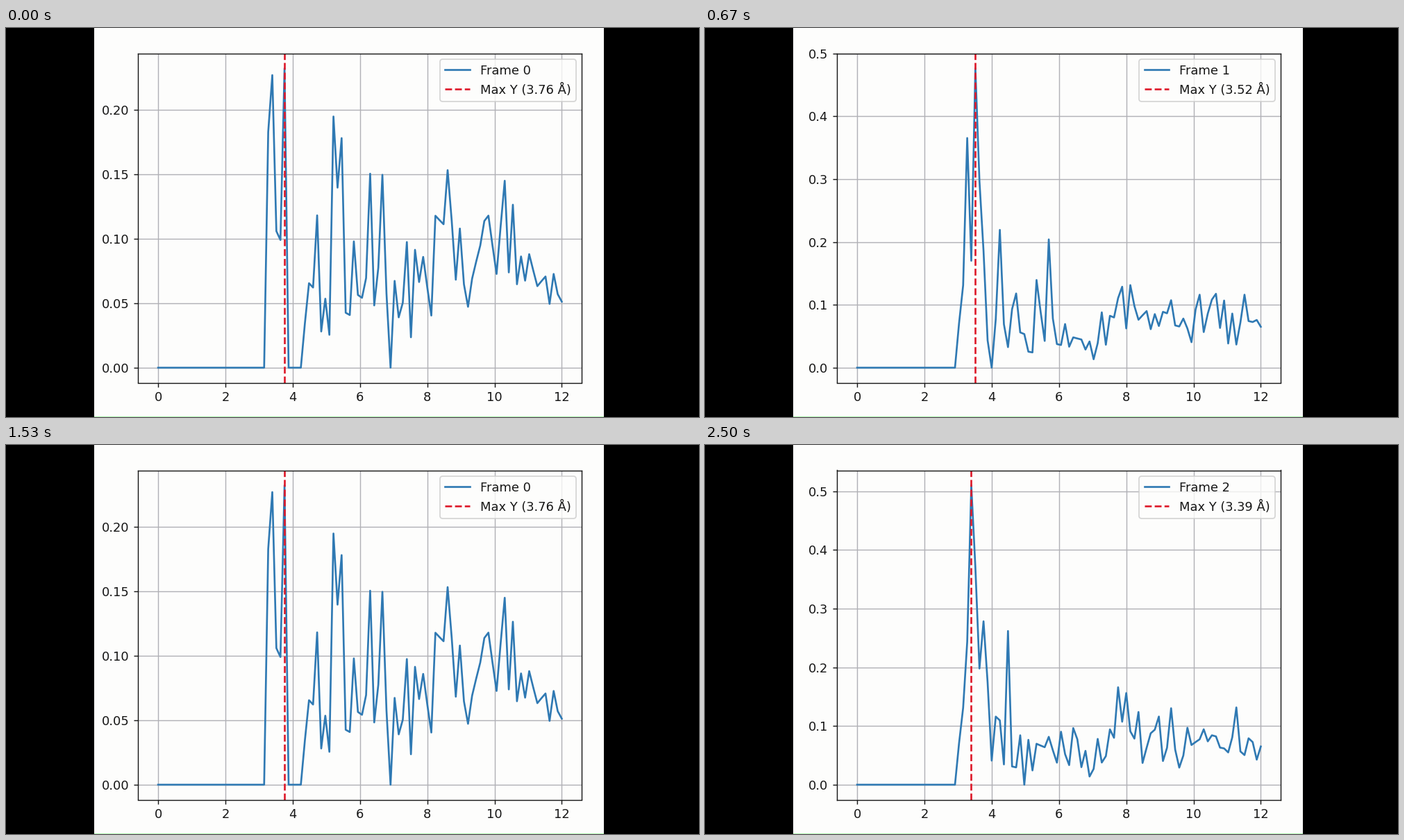
Animation of 998x561 px, one loop 2530 ms. Source, as a matplotlib script:

```python
import matplotlib.pyplot as plt
import numpy as np
from matplotlib.animation import FuncAnimation
from matplotlib.patches import Rectangle

W, H, DPI = 998, 561, 128
FRAMES, LOOP_MS = 76, 2530
HOLD, OFFSET = 15, 4          # frames per plot, frames already elapsed at start
PAPER, INK = "#fdfdfc", "#161616"
BLUE, RED, GRID = "#2f79b3", "#de1a2b", "#b1b1b6"

plt.rcParams.update({
    "font.family": "DejaVu Sans", "font.size": 10.06,
    "text.color": INK, "axes.edgecolor": INK, "axes.facecolor": PAPER,
    "xtick.color": INK, "ytick.color": INK, "grid.color": GRID,
    "lines.linewidth": 1.5,
})

# Pair counts per distance bin; every bin before the first listed one is empty.
BINS, R_MAX, NORM = 100, 12, 0.6766
counts_a = [
    3, 4, 2, 2, 5, 0, 0, 0, 0, 1, 2, 2, 4, 1, 2, 1, 8, 6, 8, 2, 2, 5, 3, 3, 4,
    9, 3, 5, 10, 4, 0, 5, 3, 4, 8, 2, 8, 6, 8, 6, 4, 12, 12, 12, 17, 13, 8, 13,
    8, 6, 9, 11, 13, 16, 17, 14, 11, 17, 23, 12, 21, 11, 15, 12, 16, 14, 12,
    13, 14, 10, 15, 12, 11]
counts_b = [
    1, 2, 6, 3, 9, 6, 4, 1, 0, 2, 6, 2, 1, 3, 4, 2, 2, 1, 1, 6, 4, 2, 10, 4, 2,
    2, 4, 2, 3, 3, 3, 2, 3, 1, 3, 7, 3, 7, 7, 10, 12, 6, 13, 10, 8, 9, 10, 7,
    10, 8, 11, 11, 14, 9, 9, 11, 9, 6, 14, 18, 9, 14, 18, 20, 11, 19, 7, 16, 7,
    14, 23, 15, 15, 16, 14]
counts_c = [
    1, 2, 4, 9, 7, 4, 6, 4, 1, 3, 3, 1, 8, 1, 1, 3, 0, 3, 1, 3, 3, 3, 4, 3, 2,
    5, 3, 2, 6, 5, 2, 4, 1, 2, 6, 3, 4, 8, 7, 15, 10, 15, 9, 8, 13, 4, 7, 10,
    11, 14, 5, 8, 17, 8, 4, 7, 14, 10, 11, 12, 15, 12, 14, 14, 11, 11, 10, 15,
    25, 11, 10, 16, 15, 9, 14]

r = np.linspace(0, R_MAX, BINS)
shell = (r + r[1] / 2) ** 2


def density(counts):
    """Divide the counts by the size of their spherical shells."""
    full = np.zeros(BINS)
    full[-len(counts):] = counts
    return NORM * full / shell


def make_plot(fig, number, counts, step):
    left, right, bottom, top = 190, 829.5, 49.5, 524.5
    ax = fig.add_axes([left / W, bottom / H, (right - left) / W, (top - bottom) / H])
    y = density(counts)
    peak = r[y.argmax()]
    ax.plot(r, y, color=BLUE, label=f"Frame {number}")
    ax.axvline(peak, color=RED, ls="--", label=f"Max Y ({peak:.2f} Å)")
    ax.set_xlim(-0.05 * R_MAX, 1.05 * R_MAX)
    ax.set_ylim(-0.05 * y.max(), 1.05 * y.max())
    ax.set_xticks(range(0, R_MAX + 1, 2))
    ax.set_yticks(np.arange(0, 1.05 * y.max(), step))
    ax.yaxis.set_major_formatter("{x:.2f}" if step < 0.1 else "{x:.1f}")
    ax.grid(True)
    ax.legend(loc="upper right")
    return ax


fig = plt.figure(figsize=(W / DPI, H / DPI), dpi=DPI, facecolor="black")
for y0, height, color in ((0, H, PAPER), (0, 1.4, "#b4f7b4")):
    fig.add_artist(Rectangle((127, y0), 734, height, color=color, lw=0,
                             transform=None, zorder=-1))

plots = [make_plot(fig, 0, counts_a, 0.05),
         make_plot(fig, 1, counts_b, 0.1),
         make_plot(fig, 2, counts_c, 0.1)]


def update(k):
    shown = (k + OFFSET) // HOLD % len(plots)
    for i, ax in enumerate(plots):
        ax.set_visible(i == shown)
    return plots


update(0)
anim = FuncAnimation(fig, update, frames=FRAMES, interval=LOOP_MS / FRAMES,
                     repeat=True, repeat_delay=0, blit=False)
plt.show()
```
